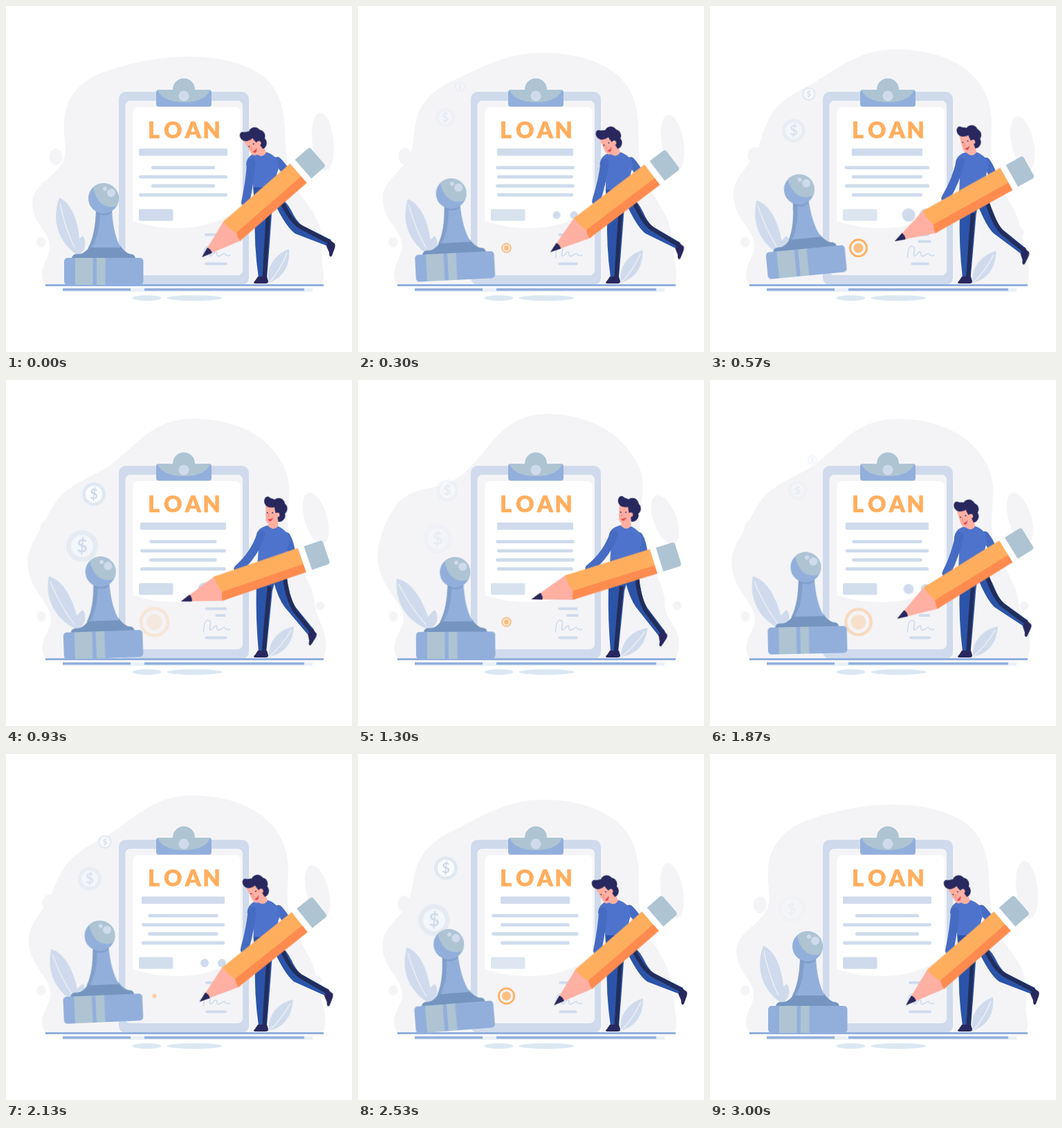
Write an HTML page that moves like this. It is 500 by 500 pixels and loops after 3060 ms.

```html
<!DOCTYPE html>
<html lang="en">
<head>
<meta charset="utf-8">
<title>Loan signing</title>
<style>
html,body{margin:0;width:100%;height:100%;overflow:hidden;background:#fff}
svg{display:block;width:100%;height:100%}
text{font-family:Lato,Inter,sans-serif;font-weight:900}

.swell,.drift,.lean,.sway,.breathe,.fade,.dot,.ring,.coin,.stamp{animation:3060ms linear infinite}
.swell{animation-name:morphSlow}
.drift{animation-name:moveSlow}
.lean{animation-name:morphLean}
.sway{animation-name:moveLean}
.lean,.sway{animation-timing-function:cubic-bezier(.37,0,.63,1)}
.breathe{animation-name:breathe;--a:scaleX(1);--b:scaleX(.766);transform-box:fill-box;transform-origin:center}
.anti{--a:scaleX(.72);--b:scaleX(1)}
.fade{animation-name:fade}
.dot{animation-name:dot;transform-box:fill-box;transform-origin:center}
.ring{animation-name:ring}
.coin{animation-name:coin}
.coin text{font-weight:700;font-size:27px;text-anchor:middle}
.stamp{animation-name:stamp;transform-origin:84px 402px}

@keyframes morphSlow{0%,98.04%,to{d:var(--a)}44.12%{d:var(--b)}}
@keyframes moveSlow{0%,98.04%,to{transform:var(--a)}44.12%{transform:var(--b)}}
@keyframes morphLean{0%,78%,to{d:var(--a)}38.1%{d:var(--b)}}
@keyframes moveLean{0%,78%,to{transform:var(--a)}38.1%{transform:var(--b)}}
@keyframes breathe{
  0%,32.68%,65.36%,98.04%,to{transform:var(--a)}
  16.34%,49.02%,81.7%{transform:var(--b)}
}
@keyframes fade{
  0%,32.68%,65.36%,98.04%,to{opacity:1}
  16.34%,49.02%,81.7%{opacity:.66}
}
@keyframes dot{
  0%,81.7%,to{transform:scale(0)}
  17%,33%{transform:scale(.96)}
  53.27%{transform:scale(.86)}
  69.61%{transform:scale(.6)}
}
@keyframes ring{
  0%,32.69%,65.37%,98.04%,to{transform:translate(214.500px,349.700px) scale(0)}
  32.68%,65.36%,98.03%{transform:translate(214.500px,349.700px) scale(1)}
  0%,21.8%,32.69%,54.4%,65.37%,87.1%,to{opacity:1}
  32.68%,65.36%,98.03%{opacity:0}
}
@keyframes coin{
  0%,53.27%{transform:var(--start);opacity:0}
  18.63%,69.61%{transform:var(--mid);opacity:.75}
  30.39%,82.68%{transform:var(--low);opacity:1}
  49%{transform:var(--out);opacity:0}
  98.04%{transform:var(--out);opacity:var(--left)}
  to{transform:var(--out);opacity:0}
}
@keyframes stamp{
  0%,45%,53.3%,98.04%,to{transform:translateY(0) rotate(0)}
  18.63%{transform:translateY(-8px) rotate(-5.5deg)}
  30.39%{transform:translateY(1px) rotate(-2deg)}
  69.61%{transform:translateY(-13px) rotate(-2.5deg)}
  82.68%{transform:translateY(1px) rotate(-4.5deg)}
}

.bg{fill:#f4f4f7}
.pale{fill:#cfdbec}
.blue{fill:#92afdc}
.deep{fill:#7595c0}
.teal{fill:#aec4d3}
.navy{fill:#28285f}
.skin{fill:#ffb0a3}
.pants{fill:#2b54a9}
.arm{fill:none;stroke:#466bc2;stroke-width:12;stroke-linecap:round}
.shade{fill:none;stroke:#222d5a;stroke-width:6}
.thin{fill:none;stroke:#cfdbec;stroke-width:1.6;stroke-linecap:round}
</style>
</head>
<body>
<svg viewBox="0 0 500 500">
  <!-- backdrop -->
  <g class="bg">
    <path class="swell" style="--a:path('M57 403C44 382 60 370 63 352C66 325 38 318 38 284C39 256 76 246 84 220C89 205 82 190 84 165C87 128 112 106 140 96C175 83 220 73 265 73C310 73 350 84 372 102C394 120 401 145 403 175C404 200 404 225 414 250C424 276 444 292 452 315C460 338 454 360 458 380C460 390 459 398 456 403Z');--b:path('M57 403C44 382 63 365 66 347C68 320 28 300 28 253C28 232 36 210 47 190C56 174 70 164 86 160C112 155 130 154 152 138C188 108 205 48 273 48C318 48 360 65 382 90C402 112 412 130 412 150C412 180 402 200 410 232C418 262 446 300 443 325C442 345 464 355 464 378C464 390 462 398 459 403Z')"/>
    <ellipse class="drift" rx="9.5" ry="12" style="--a:translate(72px,218px);--b:translate(53px,213px)"/>
    <ellipse class="drift" rx="15.5" ry="42" style="--a:translate(458px,196px) rotate(-6deg);--b:translate(443px,202px) rotate(-21deg) scale(1.08,.88)"/>
    <circle class="drift" r="6.5" style="--a:translate(436px,327px);--b:translate(462px,326px)"/>
    <ellipse cx="51" cy="341.500" rx="6.500" ry="7.500"/>
  </g>

  <!-- ground -->
  <g fill="#dce7f3">
    <ellipse cx="203.500" cy="422" rx="21" ry="4"/>
    <ellipse cx="272.500" cy="422" rx="40" ry="4"/>
    <path d="M82 408H443V413H82Z" opacity=".6"/>
  </g>
  <path class="blue" d="M82 408H180V411.500H82ZM200 408H431V411.500H200Z"/>

  <!-- leaves -->
  <g class="drift" style="--a:rotate(0deg);--b:rotate(-15.700deg);transform-origin:105px 362px">
    <path class="pale" d="M77 277C99 287 108 322 107 362C84 350 62 318 77 277Z"/>
    <path d="M78 285Q87 330 106 361" fill="none" stroke="#f4f4f7" stroke-width="1.200"/>
  </g>
  <path class="pale" d="M111 332C119 344 112 356 103 362C95 354 98 342 111 332Z"/>
  <g class="drift" style="--a:rotate(0deg);--b:rotate(12.600deg);transform-origin:380px 400px">
    <path class="pale" d="M409 351C411 374 402 392 380 400C375 378 388 359 409 351Z"/>
    <path d="M406 357Q396 382 381 399" fill="none" stroke="#f4f4f7" stroke-width="1.200"/>
  </g>

  <!-- clipboard -->
  <rect class="pale" x="163" y="124" width="188" height="279" rx="10"/>
  <rect class="bg" x="172.500" y="137" width="169.500" height="252" rx="7"/>
  <path fill="#fff" d="M192 146H331Q339 146 339 154V290Q304 321 248 321Q212 321 183.500 311V154Q183.500 146 192 146Z"/>
  <circle class="teal" cx="257" cy="120.500" r="16"/>
  <rect class="blue" x="217" y="121" width="80" height="24.500" rx="4"/>
  <path class="teal" d="M219 121H295C291 133 276 139 257 139S223 133 219 121Z"/>
  <circle class="pale" cx="257" cy="130" r="7.500"/>
  <text x="205" y="190.500" dx="0 2.300 1 -1.800" font-size="32.500" letter-spacing="4.200" fill="#ffae5e" stroke="#ffae5e" stroke-width=".5">LOAN</text>

  <g class="pale">
    <rect class="breathe" x="192" y="206" width="128" height="10.500" rx="1.500"/>
    <rect class="breathe anti" x="192" y="231.200" width="128" height="4.800" rx="2.400"/>
    <rect class="breathe" x="192" y="244.400" width="128" height="4.800" rx="2.400"/>
    <rect class="breathe anti" x="192" y="257.600" width="128" height="4.800" rx="2.400"/>
    <rect class="breathe" x="192" y="270.600" width="128" height="4.800" rx="2.400"/>
    <rect class="fade" x="192" y="293.500" width="49.500" height="17" rx="2.500"/>
    <circle class="dot" cx="287" cy="302" r="10"/>
    <circle class="dot" cx="312" cy="302" r="10"/>
    <rect class="breathe" x="287" y="328.500" width="33" height="4" rx="2"/>
    <rect class="breathe anti" x="300" y="338.200" width="20" height="4" rx="2"/>
    <rect class="breathe" x="287" y="370.600" width="33" height="4" rx="2"/>
  </g>
  <path class="thin" d="M285.500 364Q286 347 292 347Q297 348 295 356Q293 364 298 360Q304 352 305 358Q305 364 311 360Q315 356 317 359T324 360"/>

  <g class="ring" fill="#ffae5e">
    <circle r="21" fill="none" stroke="#ffae5e" stroke-width="5"/>
    <circle r="12.300" opacity=".78"/>
  </g>
  <path class="blue" d="M57 402H459V405H57Z"/>

  <!-- coins -->
  <g class="coin" style="--start:translate(132px,140px) scale(.45);--mid:translate(121px,180px) scale(.74);--low:translate(110px,240px) scale(1);--out:translate(118px,224px) scale(.87);--left:.2">
    <circle r="23" fill="#e6ebf2"/>
    <circle r="16" fill="#f3f6fa"/>
    <text y="9.500" fill="#d0dcec">$</text>
  </g>
  <g class="coin" style="--start:translate(152px,105px) scale(.2);--mid:translate(143px,127px) scale(.44);--low:translate(127px,165px) scale(.74);--out:translate(130px,157px) scale(.65);--left:0">
    <circle r="23" fill="#e0e8f2"/>
    <circle r="16.500" fill="#fafbfd"/>
    <text y="9.500" fill="#cbd8ea">$</text>
  </g>

  <!-- stamp -->
  <g class="stamp">
    <path class="deep" d="M121 346H165Q170 355 180 359H106Q117 356 121 346Z"/>
    <path class="deep" d="M101 358.500H181Q187 359 187 366H95Q95 359 101 358.500Z"/>
    <path class="blue" d="M130 292H153C154 316 158 336 166 349H119C126 336 130 316 130 292Z"/>
    <path class="deep" d="M130 298L136 300Q135 330 124 349H119Q129 330 130 298Z" opacity=".6"/>
    <path class="deep" d="M130 298C137 304 147 304 153 298V292H130Z" opacity=".6"/>
    <rect class="blue" x="84" y="364" width="114.500" height="39" rx="5"/>
    <path class="teal" d="M100 364H125.500V403H100ZM131 364H143.500V403H131Z"/>
    <circle class="blue" cx="141" cy="278" r="22"/>
    <path class="teal" d="M126 262A22 22 0 0 1 160 289Q133 296 126 262Z"/>
    <circle class="pale" cx="152" cy="270" r="6"/>
    <circle class="pale" cx="143" cy="264" r="3"/>
  </g>

  <!-- person -->
  <path class="pants lean" style="--a:path('M378 262L395 278Q404 280 412 295Q420 312 428 317L470 338L465 347L418 329Q405 320 388 285Z');--b:path('M382 280L406 280Q407 296 410 310Q413 322 418 330L443 364L434 371L401 328Q392 315 386 290Z')"/>
  <path class="shade lean" style="--a:path('M399 284Q413 313 427 320L467 341');--b:path('M403 284Q405 312 415 333L439 366')"/>
  <path class="navy sway" style="--a:translate(0px,0px) rotate(0deg);--b:translate(-30px,24px) rotate(14deg);transform-origin:470px 348px" d="M467 337L473 342Q477 343 475 350L471 361Q467 365 467 356L463 347Z"/>
  <path class="pants lean" style="--a:path('M357 260L388 260L384 300Q381 345 377 393L365 393Q358 345 360 300Z');--b:path('M362 282L392 282L385 305Q381 345 376 393L365 393Q361 345 362 300Z')"/>
  <path class="shade lean" style="--a:path('M379 300Q376 345 373.500 393');--b:path('M381 298Q376 345 372.500 393')"/>
  <path class="navy" d="M364 391H377L379 398Q379 401 375 401H360Q356 400 360 397Z"/>

  <path class="arm lean" style="--a:path('M392 224Q399 231 407 243');--b:path('M406 226Q412 236 413 254')"/>
  <path class="lean" fill="#4e73cc" style="--a:path('M362 212C354 214 347 220 347 230L357 240L357 262L388 262L392 240C397 230 394 217 376 211Z');--b:path('M380 210C371 212 364 216 363 226L366 240L363 284L403 284L408 242C414 230 411 219 394 211Z')"/>
  <path class="arm lean" style="--a:path('M354 227Q353 250 346 284');--b:path('M370 223Q360 252 334 272')"/>
  <path class="skin lean" style="--a:path('M361 204L372 202L376 212Q370 221 361 213Z');--b:path('M384 202L395 200L395 211Q388 219 380 210Z')"/>
  <!-- head, drawn upright around its own centre -->
  <g class="sway" style="--a:translate(357px,202px) rotate(-30deg);--b:translate(386px,193px) rotate(3deg)">
    <path class="skin" d="M-8 -14L6 -13L11 1Q8 12 0 14Q-7 15 -8 7Z"/>
    <path class="navy" d="M-8 -13C-13 -19 -8 -28 -3 -25C-1 -22 3 -23 5 -21C11 -26 19 -22 20 -15C25 -11 24 -4 20 -1C22 6 16 12 10 11L9 3C7 1 5 -5 5 -10C1 -9 -5 -9 -8 -13Z"/>
    <circle class="skin" cx="9" cy="1" r="3.200"/>
    <path d="M-5 7Q-1 8 3 5Q1 11 -3 10Z" fill="#e8434f"/>
    <circle class="navy" cx="-5.500" cy="-2" r=".9"/>
    <circle class="navy" cx="2" cy="-2" r=".9"/>
    <path d="M-3 -1L-5 4H-3" fill="none" stroke="#f08577" stroke-width="1"/>
  </g>

  <!-- pencil, tip at its own origin -->
  <g class="sway" style="--a:translate(283px,363px) rotate(-41deg);--b:translate(249.500px,315.500px) rotate(-16.500deg)">
    <path class="skin" d="M0 0L57 -18.500H62V18.500H57Z"/>
    <path class="navy" d="M0 0L15 -5.200Q18 0 15 5.200Z"/>
    <path fill="#ffae5e" d="M57 -18.500H186V6H61Q56 -6 57 -18.500Z"/>
    <path fill="#ff8b4f" d="M61 6H186V18.500H57Q58 11 61 6Z"/>
    <path fill="#fff" d="M185 -18.500H195V18.500H185Z"/>
    <path class="teal" d="M194 -18H218Q222 -18 222 -14V14Q222 18 218 18H194Z"/>
  </g>
</svg>
</body>
</html>
```
